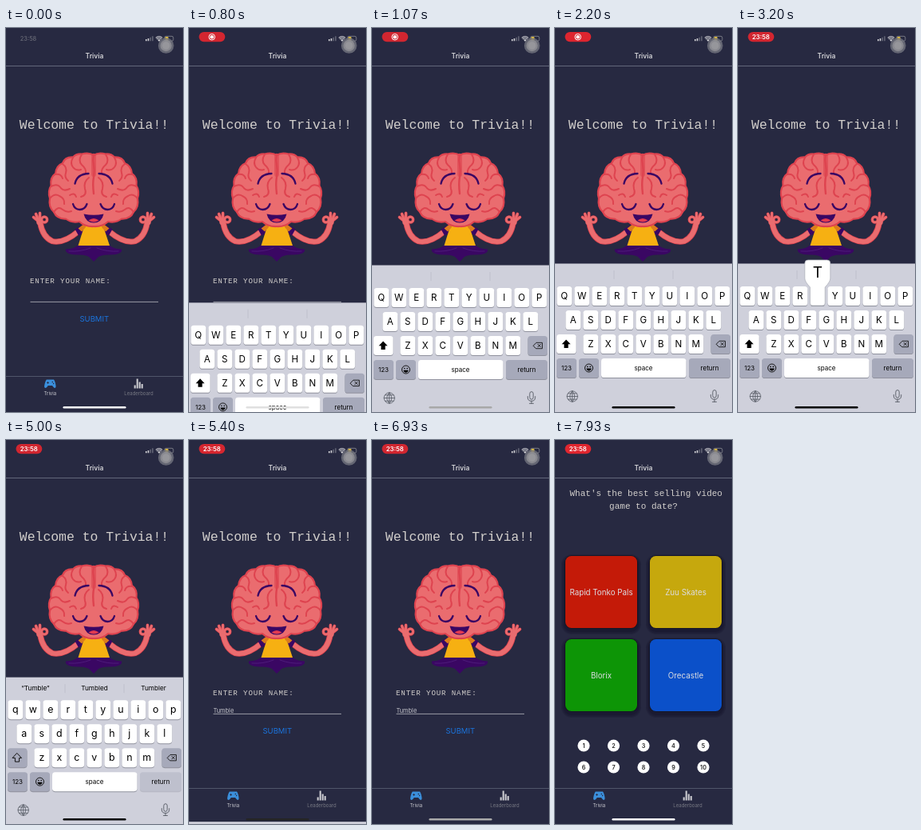
Recreate the animation shown at these times as an HTML page. Size 222x480 px, loop 8000 ms.

```html
<!DOCTYPE html>
<html lang="en">
<head>
<meta charset="utf-8">
<title>Trivia</title>
<style>
html, body { margin: 0; width: 100%; height: 100%; overflow: hidden; background: #272941; }
svg { display: block; width: 100vw; height: 100vh; }
text { font-family: Inter, Roboto, sans-serif; }
.mono { font-family: "Liberation Mono", "Noto Sans Mono", monospace; fill: #d2cfcc; white-space: pre; }
.mid { text-anchor: middle; }
</style>
</head>
<body>
<svg viewBox="0 0 222 480">
  <rect width="222" height="480" fill="#272941"/>

  <g id="home">
    <text class="mono" x="16.8" y="126" font-size="16.45">Welcome to Trivia!!</text>
    <g id="brain"></g>
    <text class="mono" x="30" y="319" font-size="9.2" letter-spacing=".83">ENTER YOUR NAME:</text>
    <text id="name" x="30.5" y="340.5" font-size="7.4" fill="#c4c4cb"></text>
    <path d="M30.5 342.4H191" stroke="#9a9ba5"/>
    <text id="submit" class="mid" x="110.8" y="367.3" font-size="9.5" fill="#1b74dc">SUBMIT</text>
  </g>

  <g id="quiz">
    <text class="mono" x="18.5" y="70" font-size="11">What's the best selling video</text>
    <text class="mono mid" x="111" y="86" font-size="11">game to date?</text>
    <g id="cards"></g>
    <g id="dots"></g>
  </g>

  <text class="mid" x="111" y="38.3" font-size="8.5" font-weight="600" fill="#d2d2d6">Trivia</text>
  <path d="M0 47.5H222" stroke="#62677b"/>
  <path d="M0 435.5H222" stroke="#50556a"/>
  <path d="M50.8 439.5H60Q62 442 62.6 448Q62 451.5 59.6 449L58 447H52.8L51.2 449Q48.5 451.5 48 448Q48.8 442 50.8 439.5Z" fill="#3b8fdb"/>
  <path d="M51 443.4H54M52.5 442V444.8" stroke="#272941" stroke-width=".8"/>
  <circle cx="58.3" cy="442.5" r=".8" fill="#272941"/>
  <circle cx="59.6" cy="444.5" r=".7" fill="#272941"/>
  <text class="mid" x="55.3" y="459.2" font-size="6" fill="#c8c8ce">Trivia</text>
  <path d="M161.7 450.5V446.5M164.7 450.5V438.5M167.7 450.5V442.5M170.7 450.5V445" stroke="#c9c9ce" stroke-width="2.1"/>
  <text class="mid" x="166.5" y="459.2" font-size="6" fill="#777983">Leaderboard</text>

  <text id="clock" class="mid" x="28" y="15.9" font-size="7.4" font-weight="500" fill="#696b77">23:58</text>
  <g id="pill">
    <rect id="pillBox" x="12.5" y="5" width="32.8" height="12.2" rx="6.1" fill="#e0262f"/>
    <g id="rec"><circle cx="28.7" cy="11.2" r="3.8" fill="none" stroke="#fff" stroke-width="1"/><circle cx="28.7" cy="11.2" r="2.3" fill="#fff"/></g>
    <text id="pillTime" class="mid" x="28.7" y="14" font-size="7.8" font-weight="600" fill="#fff">23:58</text>
  </g>
  <g fill="#d0d0d4">
    <path d="M175 14h1.6v2.3h-1.6zM177.7 13h1.6v3.3h-1.6z"/>
    <path d="M180.4 11.7h1.6v4.6h-1.6zM183.1 10.3h1.6v6h-1.6z" opacity=".35"/>
    <path d="M192 17L190.1 14.8Q192 13.3 193.9 14.8Z"/>
  </g>
  <path d="M187.8 12.3Q192 8.6 196.2 12.3M189 13.8Q192 11.2 195 13.8" fill="none" stroke="#d0d0d4" stroke-width="1.1"/>
  <rect x="198.8" y="10.3" width="11" height="6" rx="1.8" fill="none" stroke="#8c8d95" stroke-width=".8"/>
  <rect x="199.6" y="11.1" width="4" height="4.4" rx=".8" fill="#e8c33a"/>
  <circle cx="200.7" cy="22" r="9.8" fill="#74757f" opacity=".8"/>
  <circle cx="200.7" cy="22" r="7.2" fill="#929297" opacity=".8"/>
  <circle cx="200.7" cy="22" r="4.8" fill="#9f9fa3" opacity=".6"/>

  <g id="board"></g>
  <rect id="bar" x="71.5" y="473" width="79" height="2.4" rx="1.2"/>
</svg>

<script>
const $ = id => document.getElementById(id);
const clamp = x => Math.max(0, Math.min(1, x));
const ramp = (t, a, b) => clamp((t - a) / (b - a));
const label = (x, y, size, s, more = '') =>
  `<text class="mid" x="${x}" y="${y}" font-size="${size}" ${more}>${s}</text>`;
const box = (x, y, w, h, r, fill) =>
  `<rect x="${x}" y="${y}" width="${w}" height="${h}" rx="${r}" fill="${fill}"/>`;
const shape = (d, fill) => `<path d="${d}" fill="${fill}"/>`;
const line = (d, color, w) =>
  `<path d="${d}" fill="none" stroke="${color}" stroke-width="${w}" stroke-linecap="round" stroke-linejoin="round"/>`;
const mirror = s => s + `<g transform="matrix(-1 0 0 1 220 0)">${s}</g>`;

// Meditating brain: nearly every part is a left half and its mirror image
const PINK = '#ea6c6f', RED = '#de434f', PLUM = '#3a0763', GOLD = '#f6b012';

function drawBrain() {
  const rim = 'M110 159Q104 155 95 157.5Q88 157 84 161.5Q74 161 71 169Q63 172 62 182Q55 187 56.5 197' +
    'Q52 204 55 213Q53 224 60 230Q64 239 75 238.5Q82 244 92 242Q99 248.5 110 248';
  const folds = 'M95 158Q90 166 95 171Q101 176 100 182M84 162Q80 169 84 174Q88 179 94 177' +
    'M71 170Q77 174 75 181Q73 187 78 191M62 183Q69 182 71 188M56.5 198Q64 194 68 199Q72 205 80 201' +
    'M55 213Q61 206 67 210Q74 213 73 220M60 230Q65 222 71 227Q76 231 82 229' +
    'M104 187Q97 192 99 201Q102 209 94 211M80 209Q86 205 88 211';
  const arm = 'M43 244Q46 261 58 266.5Q72 270 91 254';
  const fingers = 'M40 241L34.5 236.5M40.5 240L37.5 232.5M42.5 240L42.5 231.5';
  const ring = 'M44.6 239.5A3.5 3.5 0 1 0 51.6 239.5A3.5 3.5 0 1 0 44.6 239.5';
  const legs = 'M110 270H92Q86 276.5 75 276.5Q73.5 283 89 283.5Q103 283 106 288L110 292Z';
  $('brain').innerHTML =
    mirror(line(arm, RED, 7.4) + line(fingers, RED, 3.8) + line(ring, RED, 3.6) +
      line(arm, PINK, 5.8) + `<circle cx="42" cy="242.5" r="3.8" fill="${PINK}"/>` +
      line(fingers, PINK, 2.8) + line(ring, PINK, 2.3) +
      shape(legs, PLUM) + line('M79 279Q93 280 106 275', '#562485', .7) +
      shape('M99 244L86.5 251.5L91 259.5L95 257L91 272H97L104 246Z', PLUM)) +
    shape('M99 245H121L130 272H90.5Z', GOLD) +
    mirror(shape('M99 244L90.5 250.5L95 254.5L100 249Z', '#dc7c1c')) +
    mirror(shape(rim + 'Z', PINK)) + line('M110 160V183', '#e2535b', 6) +
    mirror(line(rim, RED, 2.2) + line(folds, RED, 2)) +
    line('M110 158Q108.5 165 110 171Q111.5 178 110 186Q108.5 195 110 207', RED, 2.4) +
    mirror(line('M86.5 194.5Q89 182.5 103.5 182', PLUM, 2.3) +
      line('M84 220Q86 227 92.5 227Q99 227 101.5 220', PLUM, 2.3)) +
    shape('M97.5 232.5Q110 235 122.5 232.5Q120 243.5 110 243.5Q100 243.5 97.5 232.5Z', PLUM) +
    shape('M103.5 240.5Q110 235.5 116.5 240.5Q110 244.5 103.5 240.5Z', '#e23a50');
}

function drawQuiz() {
  const cards = [['Rapid Tonko Pals', '#c41a08'], ['Zuu Skates', '#c6a80d'], ['Blorix', '#0d9506'], ['Orecastle', '#0b50c9']];
  $('cards').innerHTML = cards.map(([s, color], i) => {
    const x = 13 + i % 2 * 106, y = 145 + (i >> 1) * 104;
    return [5, 3.5, 2].map(g => `<g opacity=".16">${box(x - g, y - g + 3, 90 + 2 * g, 90 + 2 * g, 8 + g, '#07081a')}</g>`).join('') +
      box(x - .6, y - .6, 91.2, 91.2, 8, '#14141f') + box(x, y, 90, 90, 7.5, color) +
      label(x + 45, y + 48.6, 9.8, s, 'fill="#dcdce0"');
  }).join('');
  $('dots').innerHTML = Array.from({length: 10}, (_, i) => {
    const x = 36 + i % 5 * 37.5, y = 382 + (i > 4) * 27;
    return `<circle cx="${x}" cy="${y}" r="7.6" fill="#fff"/>` + label(x, y + 2.6, 7.2, i + 1, 'font-weight="600" fill="#222"');
  }).join('');
}

// Keyboard
const GRAY = '#a6a9ba', keyAt = {};
const key = (x, y, w, fill) => box(x, y + 1, w, 24, 3.6, '#8f919d') + box(x, y, w, 24, 3.6, fill);

function drawBoard() {
  let keys = '', upper = '', lower = '';
  ['qwertyuiop', 'asdfghjkl', 'zxcvbnm'].forEach((row, r) => [...row].forEach((c, i) => {
    const x = [11.8, 22.8, 44.8][r] + i * 22, y = 323 + r * 30;
    keyAt[c] = [x, y];
    keys += key(x - 9.4, y, 18.8, '#fff');
    upper += label(x, y + 16.3, 11.6, c.toUpperCase());
    lower += label(x, y + 15.5, 12.4, c);
  }));
  const shift = 'M14 389.5L19.5 395.3H16.6V400H11.4V395.3H8.5Z';
  $('board').innerHTML = box(0, 294.5, 222, 190, 0, '#cfd0db') +
    '<path d="M74 303V314M148 303V314" stroke="#bbbdc9" stroke-width=".8"/>' +
    [37, 111, 185].map((x, i) => label(x, 311, 8.2, '', `id="hint${i}"`)).join('') + keys +
    `<g id="upper">${upper}${key(2, 383, 24.5, '#fff')}<path d="${shift}"/></g>` +
    `<g id="lower">${lower}${key(2, 383, 24.5, GRAY)}${line(shift, '#111', 1)}</g>` +
    key(195.5, 383, 24.5, GRAY) + line('M202.5 395L206 391.3H213.5V398.7H206ZM208 393.3L211.4 396.7M211.4 393.3L208 396.7', '#111', .9) +
    key(2, 413, 25, GRAY) + label(14.5, 428, 8, '123') +
    key(30, 413, 25, GRAY) + '<circle cx="42.5" cy="425" r="5" fill="none" stroke="#111"/>' +
    '<circle cx="40.8" cy="423.4" r=".8"/><circle cx="44.2" cy="423.4" r=".8"/><path d="M39.4 425.6H45.6Q45 428.6 42.5 428.6Q40 428.6 39.4 425.6Z"/>' +
    key(58, 413, 106.5, '#fff') + label(111, 427.8, 8, 'space') +
    `<g id="enter">${key(168, 413, 52, GRAY)}</g>` + label(194, 427.8, 8, 'return') +
    line('M15 460.5A6.7 6.7 0 1 0 28.4 460.5A6.7 6.7 0 1 0 15 460.5H28.4M21.7 453.8V467.2M21.7 453.8Q15.5 460.5 21.7 467.2Q27.9 460.5 21.7 453.8M16.4 456.8H27M16.4 464.2H27', '#555a64', .8) +
    line('M197.8 454.8A2.2 2.2 0 0 1 202.2 454.8V460A2.2 2.2 0 0 1 197.8 460Z' +
      'M195.3 458.5V460Q195.5 464.3 200 464.3Q204.5 464.3 204.7 460V458.5M200 464.3V467.3M197.5 467.3H202.5', '#555a64', .9) +
    '<g id="pop"></g>';
}

const WORD = 'Tumble', HOLD = 130;
const TAPS = [3200, 3640, 4020, 4290, 4540, 4780];
const HINTS = [['', '', ''], ['“T”', 'The', 'This'], ['“Tu”', 'Tuna', 'Tunnel'], ['“Tum”', 'Tummy', 'Tumble'],
  ['“Tumb”', 'Tumble', 'Tumbler'], ['“Tumbl”', 'Tumble', 'Tumbler'], ['“Tumble”', 'Tumbled', 'Tumbler']];

function popup(c) {
  const [x, y] = keyAt[c.toLowerCase()];
  const t = y - 33, l = x - 16, r = x + 16;
  const d = `M${l + 4} ${t}H${r - 4}Q${r} ${t} ${r} ${t + 4}V${t + 23}Q${r} ${t + 27} ${x + 9.4} ${t + 34}` +
    `V${y + 21}Q${x + 9.4} ${y + 24} ${x + 6} ${y + 24}H${x - 6}Q${x - 9.4} ${y + 24} ${x - 9.4} ${y + 21}V${t + 34}` +
    `Q${l} ${t + 27} ${l} ${t + 23}V${t + 4}Q${l} ${t} ${l + 4} ${t}Z`;
  return `<path d="${d}" fill="#fff" stroke="#a9acb6" stroke-width=".7"/>` + label(x, t + 21.5, 19, c);
}

const OPEN = 620, CLOSE = 4990, CUT = 7340;
const settle = ms => { const k = Math.max(0, ms) * .0145; return (1 + k) * Math.exp(-k); };
const show = (id, on) => $(id).style.display = on ? '' : 'none';
const fade = (id, a) => $(id).style.opacity = a;

function draw(t) {
  show('home', t < CUT);
  show('quiz', t >= CUT);

  const hidden = t < CLOSE ? settle(t - OPEN) : 1 - settle(t - CLOSE);
  show('board', hidden < .999);
  $('board').setAttribute('transform', `translate(0 ${186 * hidden})`);

  // The home indicator adapts slowly to what lies under it
  const dark = ramp(t, 650, 1880) * (1 - ramp(t, CLOSE, 7900));
  const v = Math.round(255 * (1 - dark));
  $('bar').setAttribute('fill', `rgb(${v},${v},${v})`);

  const typed = TAPS.filter(a => t >= a + HOLD).length;
  const held = TAPS.findIndex(a => t >= a && t < a + HOLD);
  show('upper', typed === 0);
  show('lower', typed > 0);
  HINTS[typed].forEach((s, i) => $('hint' + i).textContent = s);
  $('pop').innerHTML = held < 0 ? '' : popup(WORD[held]);
  $('name').textContent = WORD.slice(0, typed);
  fade('enter', t > 4940 && t < 5060 ? .4 : 1);

  const pill = ramp(t, 350, 650), time = ramp(t, 2900, 3150);
  fade('clock', 1 - pill);
  fade('pill', pill);
  fade('rec', 1 - time);
  fade('pillTime', time);
  fade('pillBox', .96 + .04 * Math.cos(t / 1000 * Math.PI));
  fade('submit', 1 - .6 * ramp(t, 7070, 7180) * (1 - ramp(t, 7230, 7330)));
}

drawBrain();
drawQuiz();
drawBoard();
(function tick() {
  draw(performance.now() % 8000);
  requestAnimationFrame(tick);
})();
</script>
</body>
</html>
```
